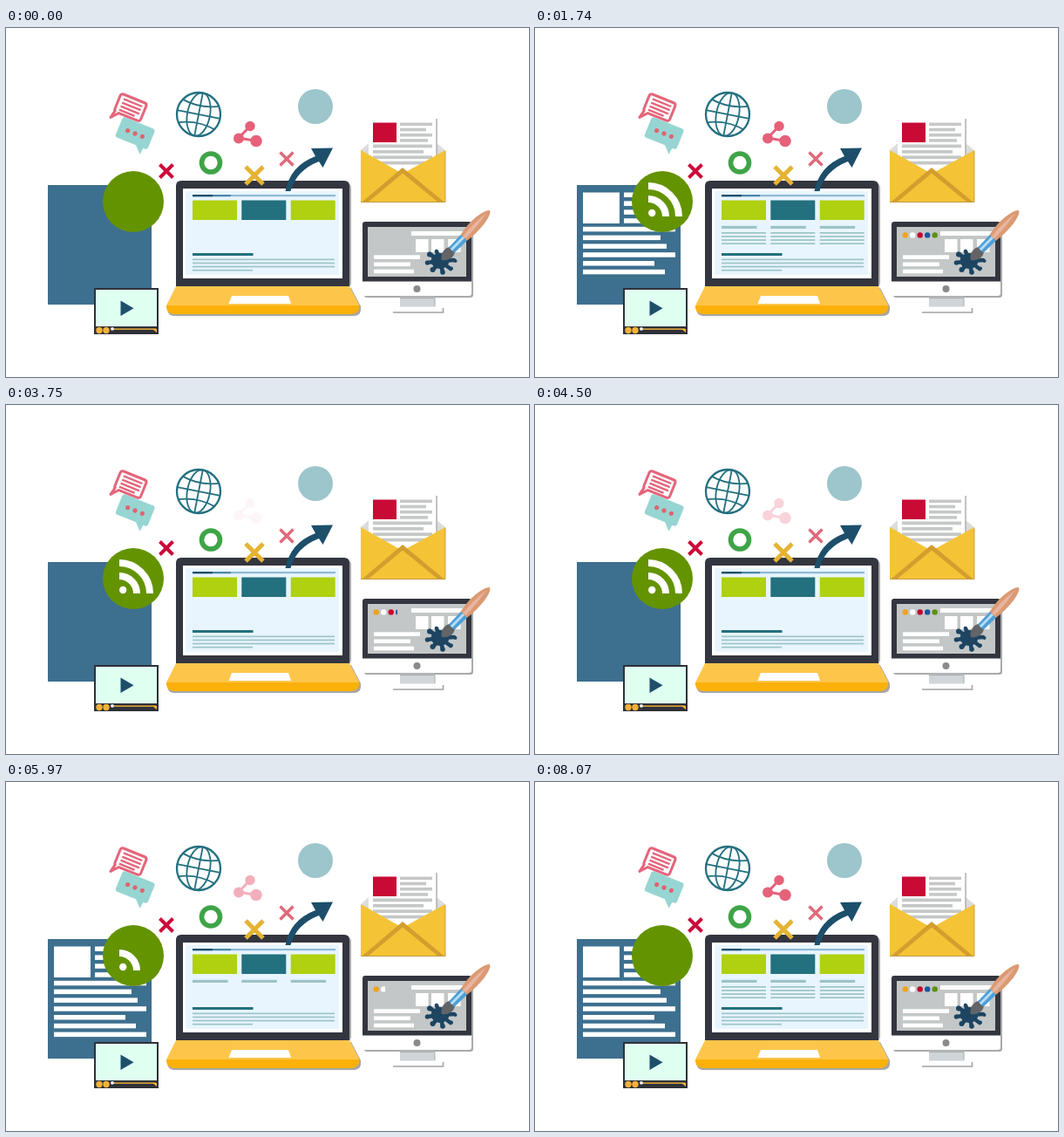
An HTML page for the animation above (8.1 s loop, 600 px wide and 400 px high).

```html
<!DOCTYPE html>
<html lang="en">
<head>
<meta charset="utf-8">
<title>Web publishing</title>
<style>
  html, body { margin: 0; width: 100%; height: 100%; overflow: hidden; background: #fff; }
  svg { display: block; width: 600px; height: 400px; }
</style>
</head>
<body>
<svg viewBox="0 0 600 400" xmlns="http://www.w3.org/2000/svg">
  <defs>
    <clipPath id="docClip"><rect id="docWipe" x="48" y="180" width="119" height="0"/></clipPath>
    <clipPath id="textClip"><rect id="textWipe" x="204" y="225" width="182" height="0"/></clipPath>
    <clipPath id="dotClip"><rect id="dotWipe" x="420" y="230" width="0" height="15"/></clipPath>
    <clipPath id="globeClip"><circle cx="221" cy="99" r="25"/></clipPath>
  </defs>

  <!-- chat bubbles -->
  <g transform="translate(148 121) rotate(22)">
    <path d="M-17-13H17Q20-13 20-10V9Q20 12 17 12H15L14 20 6 12H-17Q-20 12-20 9V-10Q-20-13-17-13Z" fill="#97d5d2"/>
    <g fill="#e0646f"><circle cx="-9" r="2.6"/><circle r="2.6"/><circle cx="9" r="2.6"/></g>
  </g>
  <g transform="translate(142.500 92) rotate(22)">
    <path d="M-13-12H13Q16-12 16-9V7Q16 10 13 10H-10L-17 18-15 9Q-16 9-16 7V-9Q-16-12-13-12Z" fill="#fff" stroke="#e4657b" stroke-width="3" stroke-linejoin="round"/>
    <path d="M-11-7H12M-11-2.500H12M-11 2H12M-11 6.300H8" stroke="#e4657b" stroke-width="2.400"/>
  </g>

  <!-- globe -->
  <g fill="none" stroke="#23707f" stroke-width="2">
    <circle cx="221" cy="99" r="25" stroke-width="2.300"/>
    <g clip-path="url(#globeClip)"><g transform="translate(221 99) rotate(11)" stroke-width="1.800">
      <ellipse rx="13" ry="25"/>
      <path d="M0-25V25M-25 0H25M-23-14Q0-6 23-14M-23 14Q0 6 23 14"/>
    </g></g>
  </g>

  <g id="share" fill="#e6617a" stroke="#e6617a">
    <path d="M280 112.500 267 126 287 129.500Z" fill="none" stroke="none"/>
    <path d="M280 112.500 267 126 287 129.500" fill="none" stroke-width="3"/>
    <g stroke="none"><circle cx="280" cy="112.500" r="5.700"/><circle cx="267" cy="126.500" r="6"/><circle cx="287" cy="129.500" r="6.800"/></g>
  </g>

  <circle cx="355" cy="90" r="20" fill="#9cc5cc"/>

  <!-- document -->
  <rect x="48" y="180" width="119" height="137" fill="#3d6f8f"/>
  <g id="docLines" clip-path="url(#docClip)" fill="#fff"><rect x="55" y="188.500" width="42" height="35.500"/></g>
  <circle cx="146" cy="199" r="35" fill="#649300"/>
  <g fill="none" stroke="#fff" stroke-width="8">
    <circle id="rss0" cx="134.200" cy="212" r="4.200" fill="#fff" stroke="none"/>
    <path id="rss1" d="M130 196A20 20 0 0 1 150 216"/>
    <path id="rss2" d="M130 181A35 35 0 0 1 165 216"/>
  </g>

  <!-- video player -->
  <rect x="101" y="298" width="74" height="53" fill="#2f3138"/>
  <rect x="103" y="300" width="70" height="42" fill="#dffff0"/>
  <path d="M131.500 312.500 146.500 321.200 131.500 330Z" fill="#1d4f6b"/>
  <g fill="#f2b13a">
    <circle cx="107" cy="346.500" r="3.700"/><circle cx="115" cy="346.500" r="3.700"/>
    <rect x="121" y="344.400" width="51" height="1.400"/><path d="M168 345H173V349Z"/>
  </g>
  <circle cx="122" cy="344.800" r="1.900" fill="#fff"/>

  <!-- laptop -->
  <rect x="197" y="177" width="199" height="121" rx="6" fill="#aaa"/>
  <path d="M195 296V181Q195 175 201 175H388Q394 175 394 181V296Z" fill="#33353f"/>
  <rect x="203" y="184" width="183" height="103" fill="#fff"/>
  <rect x="206" y="187" width="176" height="96" fill="#e8f5fe"/>
  <path d="M195 298H396L407 319V324Q406 330 398 330H192Q186 329 185 323Z" fill="#a6a6a6"/>
  <path d="M195 296H394L405.500 318H184Z" fill="#fdc64b"/>
  <path d="M184 318H405.500V321Q403 328 396 328H193Q186 328 184 321Z" fill="#fbb10a"/>
  <path d="M259 307H324L327 316H255.500Z" fill="#fff"/>
  <g id="page">
    <rect x="214" y="191" width="164" height="2.200" fill="#8fb9d6"/>
    <rect x="214" y="191" width="44" height="2.200" fill="#4c87a8"/>
    <rect x="214" y="191" width="23" height="2.200" fill="#1d4f6b"/>
    <rect x="214" y="258" width="69.500" height="3" fill="#23707f"/>
  </g>
  <g id="pageText" clip-path="url(#textClip)" fill="#9cc4c8"></g>

  <!-- crosses, ring, arrow -->
  <circle cx="235" cy="154.500" r="10.500" fill="none" stroke="#3fa447" stroke-width="5.600"/>
  <g id="crosses"></g>
  <path d="M320.500 187Q326 158 355 147L350 138 375 137.500 363.500 160 359 153Q333 163 326.500 187Z" fill="#1d4f6b"/>

  <!-- letter -->
  <path d="M407 140 416 132V146ZM504 140 494 132V146Z" fill="#ddd"/>
  <rect x="407" y="140" width="97" height="60" fill="#dadada"/>
  <rect x="416" y="104" width="78" height="70" fill="#fff"/>
  <path d="M494 104V165" stroke="#aaa" stroke-width="1.400"/>
  <rect x="421" y="108.500" width="27" height="22.500" fill="#c80a35"/>
  <g id="letterLines" fill="#c6c8c8"></g>
  <path d="M407 140 455 167 504 140V200H407Z" fill="#f4c336"/>
  <path d="M409 199 455 160 502 199Z" fill="#d39e2e"/>
  <path d="M416 199 455 166.500 495 199Z" fill="#f4c336"/>
  <path d="M407 199.500H504V141" fill="none" stroke="#b8923a" stroke-width=".8"/>

  <!-- monitor -->
  <rect x="411" y="224" width="125" height="85" rx="3" fill="#aaa"/>
  <path d="M409 291V225Q409 222 412 222H531Q534 222 534 225V291Z" fill="#33353f"/>
  <path d="M409 290.500H534V304Q534 307 531 307H412Q409 307 409 304Z" fill="#fff"/>
  <rect x="415" y="228" width="113" height="57" fill="#c4c7c7"/>
  <circle cx="471.500" cy="299" r="4" fill="#8a8a8a"/>
  <rect x="452" y="308.500" width="40" height="11" fill="#cfd5d8"/>
  <path d="M452 309.500H492V319" fill="none" stroke="#aaa"/>
  <path d="M444 326H501.500V321" fill="none" stroke="#a2a2a2" stroke-width="1.600"/>
  <g id="monitorBlocks" fill="#fff"></g>
  <g id="swatches" clip-path="url(#dotClip)"></g>

  <!-- splash and brush -->
  <g fill="#1d4562" stroke="#1d4562" stroke-linecap="round">
    <ellipse cx="498" cy="267" rx="10" ry="8.500"/>
    <path d="M498 267 486 259M498 267 483 269M498 267 490 277M498 267 501 280M498 267 510 276M498 267 514 266M498 267 494 256" stroke-width="4.600"/>
    <g stroke="none">
      <circle cx="486" cy="259.500" r="3"/><circle cx="483.500" cy="269" r="2.600"/><circle cx="489.500" cy="277" r="3"/>
      <circle cx="501" cy="280" r="2.800"/><circle cx="511" cy="275.500" r="2"/><circle cx="515.500" cy="267" r="2"/>
    </g>
  </g>
  <g transform="translate(500 266) rotate(-45.500)">
    <path d="M0 0Q4-7 13-6L18-4V4L13 6Q5 7 0 0Z" fill="#626467"/>
    <path d="M16-4.500 38-5V5L16 4.500Z" fill="#4b9fd8"/>
    <path d="M16-2 38-2V1L16 1Z" fill="#b8dcf2"/>
    <path d="M36-5Q50-8 63-6.500 76-5 79-1 79 3 64 5.500 49 7 36 5Z" fill="#db9a72"/>
    <path d="M37-2Q56-4 74-1.500 58 2 37 2Z" fill="#e8b4a0"/>
  </g>
</svg>
<script>
const NS = 'http://www.w3.org/2000/svg';
const LOOP = 8100, CYCLE = 2700, DOC_CYCLE = 3600;
const $ = id => document.getElementById(id);

function add(parent, tag, attrs) {
  const node = document.createElementNS(NS, tag);
  for (const key in attrs) node.setAttribute(key, attrs[key]);
  $(parent).appendChild(node);
}
const bar = (parent, x, y, width, height, fill) =>
  add(parent, 'rect', fill ? { x, y, width, height, fill } : { x, y, width, height });

// document rows
for (let i = 0; i < 4; i++) bar('docLines', 102, 188.5 + i * 9.9, 59, 5.5);
[106, 89, 96, 106, 82, 94, 106].forEach((w, i) => bar('docLines', 55, 227.8 + i * 9.8, w, 5.5));

// web page columns
[214, 270.3, 326.7].forEach((x, i) => {
  bar('page', x, 197.5, 51, 22.5, i === 1 ? '#23707f' : '#afd10f');
  bar('pageText', x, 226.8, 40.5, 3.2);
  for (let k = 0; k < 4; k++) bar('pageText', x, 234 + k * 4.1, 51, 1.7);
});
for (let k = 0; k < 4; k++) bar('page', 214, 264.5 + k * 4.1, k < 3 ? 163 : 69, 1.7, '#9cc4c8');

// letter text
[37, 30, 37, 32].forEach((w, i) => bar('letterLines', 452, 108.5 + i * 6.2, w, 3.6));
[68, 58, 68, 62].forEach((w, i) => bar('letterLines', 421, 133.5 + i * 6.4, w, 3.8));

// monitor layout
bar('monitorBlocks', 465, 233, 63, 5);
[470, 488, 507].forEach(x => bar('monitorBlocks', x, 242, 14.5, 15));
[53, 42, 46].forEach((w, i) => bar('monitorBlocks', 422, 260.3 + i * 8.2, w, 4.6));
['#f0a31a', '#fff', '#c8002f', '#1f55a0', '#5f8f10'].forEach((fill, i) =>
  add('swatches', 'circle', { cx: 424.7 + i * 8.5, cy: 237.4, r: 3.2, fill }));

[[184, 164, 7.5, 4, '#cb0a3a'], [285, 169, 10, 5, '#e5b333'], [322, 150, 7.5, 3.4, '#de6a7b']]
  .forEach(([x, y, r, width, stroke]) => add('crosses', 'path', {
    d: `M${x - r} ${y - r}L${x + r} ${y + r}M${x + r} ${y - r}L${x - r} ${y + r}`,
    stroke, 'stroke-width': width
  }));

// linear progress of t from start to end, clamped to 0..1
const progress = (t, start, end) => Math.min(1, Math.max(0, (t - start) / (end - start)));
const wipe = (id, attr, size) => $(id).setAttribute(attr, size);
const show = (id, on) => $(id).setAttribute('visibility', on ? 'visible' : 'hidden');

function shareOpacity(t) {
  if (t < 2700) return 1;
  return 0.45 * progress(t, 3600, 5100) + 0.05 * progress(t, 5100, 5970) + 0.5 * progress(t, 5970, 7800);
}

function render(t) {
  const phase = t % CYCLE;
  const docTime = t < DOC_CYCLE ? t : t - DOC_CYCLE;
  const docEdge = 188 + 105.5 * progress(docTime, 930, 1803);
  wipe('docWipe', 'height', docEdge > 188 ? docEdge - 180 : 0);

  const pageOn = t < CYCLE || t >= 2 * CYCLE;
  wipe('textWipe', 'height', pageOn ? 24 * progress(phase, 290, 1250) : 0);
  wipe('dotWipe', 'width', 43 * progress(phase, 60, 1530));

  [60, 390, 750].forEach((start, i) => show('rss' + i, phase >= start && phase < 2610));
  $('share').setAttribute('opacity', shareOpacity(t));
}

function tick() {
  render(performance.now() % LOOP);
  requestAnimationFrame(tick);
}
tick();
</script>
</body>
</html>
```
